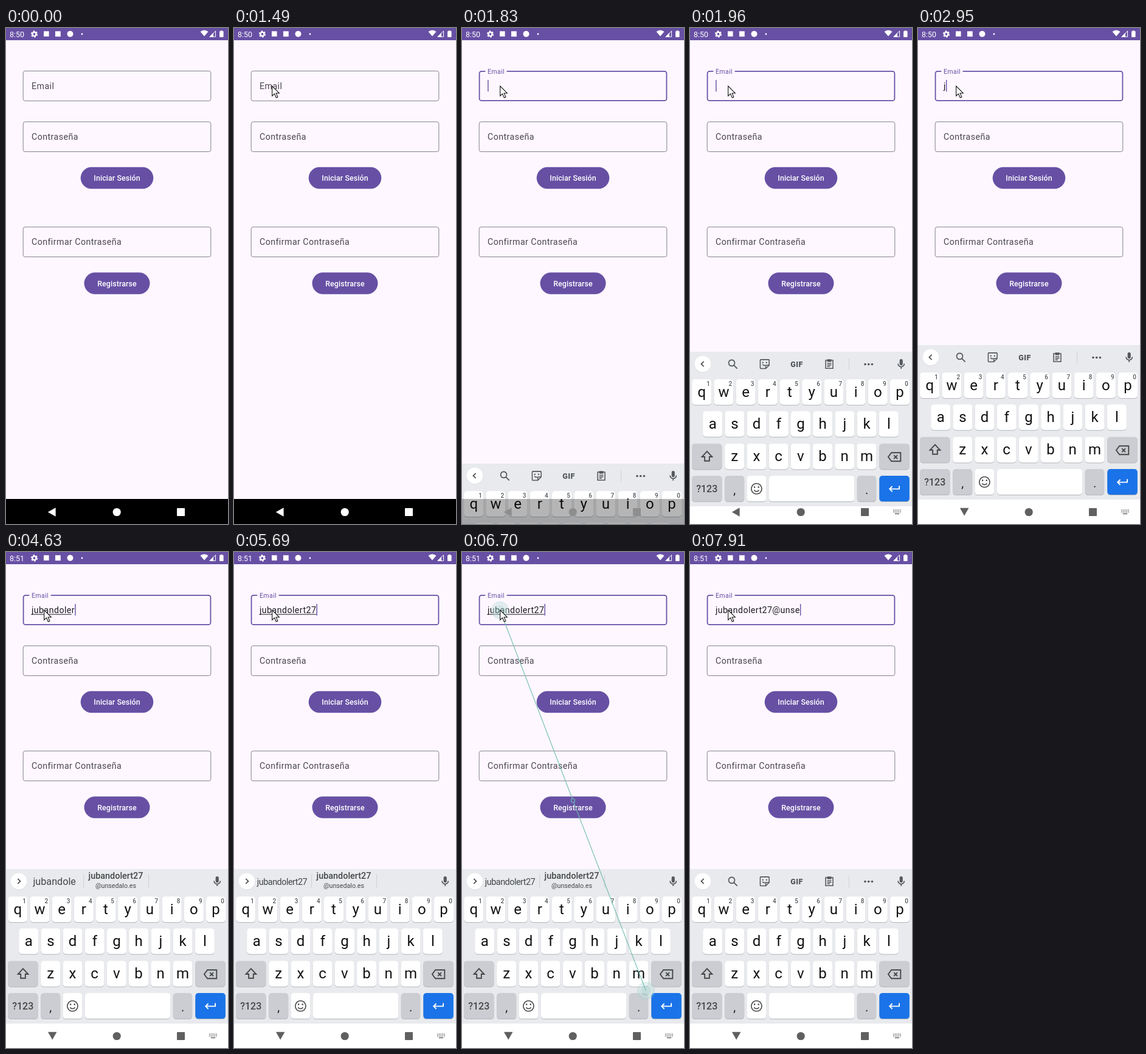
Animation of 365 by 812 pixels, one loop 8 s. Source, as an HTML page with a canvas:

```html
<!DOCTYPE html>
<html lang="es">
<head>
<meta charset="utf-8">
<title>Inicio de sesión</title>
<style>
html, body { margin: 0; width: 100%; height: 100%; overflow: hidden; background: #fef7ff; }
canvas { display: block; width: 365px; height: 812px; }
</style>
</head>
<body>
<canvas id="stage"></canvas>
<script>
const W = 365, H = 812, LOOP = 8000, MID = W / 2;
const PURPLE = '#6750a4', BG = '#fef7ff', INK = '#444746', TOOL = '#54575b';
const KEY_BG = '#e8eaed', DARK_KEY = '#cbcdd2';
const USER = 'jubandolert27', DOMAIN = '@unsedalo.es';
const TYPED = USER + DOMAIN.slice(0, 5);
const typeTimes = [2950, 3150, 3340, 3610, 3810, 3960, 4150, 4300, 4500, 4630, 4890, 5150, 5350,
  7300, 7370, 7570, 7700, 7910];
// The keyboard's composing word trails the typed text a little
const composeTimes = [3210, 3210, 3410, 3610, 3810, 3960, 4150, 4300, 4500, 4890, 5150, 5420, 5690];

const canvas = document.getElementById('stage');
const ratio = window.devicePixelRatio || 1;
canvas.width = W * ratio;
canvas.height = H * ratio;
const c = canvas.getContext('2d');

const clamp = v => Math.max(0, Math.min(1, v));
const lerp = (a, b, p) => a + (b - a) * p;
const countUntil = (times, t) => times.filter(x => x <= t).length;
const stepped = (t, start, step) => t < start ? t : start + Math.floor((t - start) / step) * step;

// cubic-bezier(.4, 0, .2, 1)
function standardEase(x) {
  let lo = 0, hi = 1;
  for (let i = 0; i < 20; i++) {
    const s = (lo + hi) / 2, r = 1 - s;
    if (1.2 * r * r * s + 0.6 * r * s * s + s * s * s < x) lo = s; else hi = s;
  }
  return lo * lo * (3 - 2 * lo);
}

function setFont(size, weight = 400, spacing = 0) {
  c.font = `${weight} ${size}px Roboto, sans-serif`;
  c.letterSpacing = spacing + 'px';
}

function text(str, x, y, size, color, { weight = 400, spacing = 0, align = 'left' } = {}) {
  setFont(size, weight, spacing);
  c.fillStyle = color;
  c.textAlign = align;
  c.fillText(str, x, y);
}

function rect(x, y, w, h, color) {
  c.fillStyle = color;
  c.fillRect(x, y, w, h);
}

function rounded(x, y, w, h, r, color) {
  c.fillStyle = color;
  c.beginPath();
  c.roundRect(x, y, w, h, r);
  c.fill();
}

function disc(x, y, r, color) {
  c.fillStyle = color;
  c.beginPath();
  c.arc(x, y, r, 0, Math.PI * 2);
  c.fill();
}

function poly(points, color) {
  c.fillStyle = color;
  c.beginPath();
  points.forEach(([x, y]) => c.lineTo(x, y));
  c.closePath();
  c.fill();
}

// Icons live on a 24 x 24 grid
function icon(x, y, size, { line, fill }, color = INK, width = 2) {
  c.save();
  c.translate(x, y);
  c.scale(size / 24, size / 24);
  c.translate(-12, -12);
  c.strokeStyle = c.fillStyle = color;
  c.lineWidth = width;
  if (fill) c.fill(new Path2D(fill));
  if (line) c.stroke(new Path2D(line));
  c.restore();
}

const EYES = 'M8.7 8a1.3 1.3 0 1 0 .01 0zM15.3 8a1.3 1.3 0 1 0 .01 0z';
const ICONS = {
  back: { line: 'M14 7l-5 5 5 5' },
  next: { line: 'M10 7l5 5-5 5' },
  search: { line: 'M10 4a5.8 5.8 0 1 0 .01 0M14 14l6.5 6.5' },
  sticker: {
    line: 'M5 4h14a1 1 0 0 1 1 1v9l-6 6H5a1 1 0 0 1-1-1V5a1 1 0 0 1 1-1zM20 14h-5a1 1 0 0 0-1 1v5M8 12.5a4 4 0 0 0 5 1.5',
    fill: EYES
  },
  clipboard: { line: 'M5 5h14v15.5H5zM8 11h8M8 14h8M8 17h5', fill: 'M8 3h8v5H8z' },
  mic: {
    line: 'M6 11.5a6 6 0 0 0 12 0M12 17.5v4',
    fill: 'M12 2.5a3 3 0 0 1 3 3v6a3 3 0 0 1-6 0v-6a3 3 0 0 1 3-3z'
  },
  shift: { line: 'M12 4L4 12.5h4.3V19h7.4v-6.5H20z' },
  erase: { line: 'M8 6h13v12H8L3.5 12zM11.5 9.5l5 5M16.5 9.5l-5 5' },
  emoji: { line: 'M12 3.5a8.5 8.5 0 1 0 .01 0M8 14a4.5 4.5 0 0 0 8 0', fill: EYES },
  enter: { line: 'M20 7v5H5M9 7.8L4.8 12 9 16.2' },
  wifi: { fill: 'M12 20L.5 6.5a17 17 0 0 1 23 0z' }
};

function statusBar(t) {
  const white = '#fff';
  rect(0, 0, W, 20, PURPLE);
  text(t < 4030 ? '8:50' : '8:51', 6, 14.5, 12.5, white);
  c.strokeStyle = white;
  c.lineWidth = 2.4;
  c.beginPath();
  c.arc(46.5, 10, 3.1, 0, Math.PI * 2);
  c.stroke();
  c.lineWidth = 1.7;
  c.setLineDash([2.6, 2.43]);
  c.beginPath();
  c.arc(46.5, 10, 4.8, 0, Math.PI * 2);
  c.stroke();
  c.setLineDash([]);
  rect(62, 5.3, 8.6, 8.6, white);
  rect(81, 5.3, 8.8, 8.8, white);
  disc(105.5, 9.8, 5, white);
  disc(125, 10, 1.4, white);
  icon(326, 9, 13.5, ICONS.wifi, white);
  poly([[334, 14.8], [341, 7.8], [341, 14.8]], white);
  c.lineWidth = 1;
  c.beginPath();
  c.moveTo(335.2, 14.3);
  c.lineTo(344.5, 14.3);
  c.lineTo(344.5, 5);
  c.closePath();
  c.stroke();
  rounded(351, 5, 6.6, 10, 1, white);
  rect(353, 4, 2.6, 1.5, white);
}

function outline(y, focused = false) {
  const i = focused ? 0.4 : 0;
  c.strokeStyle = focused ? PURPLE : '#79747e';
  c.lineWidth = focused ? 1.77 : 0.9;
  c.beginPath();
  c.roundRect(28.2 + i, y + i, 308.6 - 2 * i, 48.9 - 2 * i, 3.5);
  c.stroke();
}

const placeholder = (str, y) => text(str, 42, y, 14.2, '#49454f', { spacing: 0.443 });

function button(label, y, w) {
  rounded(MID - w / 2, y, w, 35.6, 17.8, PURPLE);
  text(label, MID, y + 22.6, 12.42, '#fff', { weight: 500, spacing: 0.09, align: 'center' });
}

function caretOn(t) {
  return t >= 1690 && !(t >= 2220 && t < 2680) && !(t >= 6170 && t < 6700);
}

function emailField(t) {
  const float = standardEase(clamp((stepped(t, 1490, 67) - 1600) / 167));
  outline(70.4, float > 0);
  if (float > 0) rect(lerp(56, 38.3, float), 68, 35.3 * float, 4.5, BG);
  text('Email', 42, lerp(99.5, 75, float), lerp(14.2, 10.64, float),
    float > 0 ? PURPLE : '#49454f', { spacing: lerp(0.443, 0.333, float) });

  const value = TYPED.slice(0, countUntil(typeTimes, t));
  text(value, 42, 100.3, 14.2, '#1d1b20', { spacing: 0.443 });
  if (t < 7300) {
    const composed = USER.slice(0, countUntil(composeTimes, t));
    if (composed) rect(42, 101.6, c.measureText(composed).width, 1, '#1d1b20');
  }
  if (caretOn(t)) rect(42.2 + c.measureText(value).width, 85, 1.4, 19, PURPLE);
}

function form(t) {
  rect(0, 20, W, H - 20, BG);
  emailField(t);
  outline(153.6);
  placeholder('Contraseña', 182.8);
  button('Iniciar Sesión', 227.7, 119.6);
  outline(325.8);
  placeholder('Confirmar Contraseña', 355.2);
  button('Registrarse', 400.2, 108);
}

function key(x, y, w, color = '#fff') {
  rounded(x, y + 1, w, 42, 5, '#b4b6ba');
  rounded(x, y, w, 42, 5, color);
}

function letterRow(letters, left, y, numbered) {
  [...letters].forEach((ch, i) => {
    const x = left + 36.2 * i;
    key(x, y, 32);
    text(ch, x + 16, y + 29, 24, '#111', { align: 'center' });
    if (numbered) text((i + 1) % 10, x + 27, y + 11, 10, '#55585c', { weight: 500, align: 'center' });
  });
}

function toolbar() {
  icon(21, 539, 20, ICONS.back, TOOL, 2.2);
  icon(70.3, 539.3, 21, ICONS.search, TOOL);
  icon(122.8, 539.2, 22, ICONS.sticker, TOOL, 1.7);
  text('GIF', 175.5, 543.5, 12.5, TOOL, { weight: 900, spacing: 0.5, align: 'center' });
  icon(229, 539, 20.5, ICONS.clipboard, TOOL, 1.8);
  rect(261, 530, 1, 19, '#d0d2d6');
  for (let i = -1; i <= 1; i++) disc(293.7 + i * 5.7, 539.5, 1.8, TOOL);
}

function suggestions(t) {
  const n = countUntil(composeTimes, t), mid = { align: 'center' };
  icon(21, 539, 20, ICONS.next, TOOL, 2.2);
  if (n > 11) text(USER.slice(0, n), 79, 544.5, 14.4, INK, { align: 'center', spacing: -0.5 });
  else text(USER.slice(0, n), 79.7, 545, 16.2, INK, mid);
  text(USER, 180.5, 534.5, 14.4, INK, { weight: 500, align: 'center' });
  text(DOMAIN, 180.5, 550, 10.7, INK, mid);
  if (n < 8) text(n < 4 ? 'junto' : 'jubón', 287, 545, 16.2, INK, mid);
  rect(127, 528, 1, 22, '#cfd1d5');
  rect(234, 528, 1, 22, '#cfd1d5');
}

function keyboard(t) {
  const p = standardEase(clamp((stepped(t, 1490, 67) - 1743) / 283));
  if (p <= 0) return;
  c.save();
  c.translate(0, Math.round(293 * (1 - p)));
  rect(0, 519, W, 253, KEY_BG);
  rect(0, 772, W, 40, '#fff');
  disc(21, 539.8, 13.3, '#d5d7db');
  disc(21, 539, 13.3, '#fff');
  if (t >= 3210 && t < 7370) suggestions(t); else toolbar();
  icon(347.2, 539, 20.5, ICONS.mic, TOOL);

  letterRow('qwertyuiop', 3.2, 564, true);
  letterRow('asdfghjkl', 21.2, 616.3);
  letterRow('zxcvbnm', 57.2, 669.4);
  key(3, 669.4, 49.5, DARK_KEY);
  icon(28, 690.5, 25, ICONS.shift, INK, 1.8);
  key(311.3, 669.4, 49.5, DARK_KEY);
  icon(335.8, 691.3, 28, ICONS.erase, INK, 1.6);

  const y = 722.1;
  key(3, y, 49.5, DARK_KEY);
  text('?123', 27.7, y + 27, 16, INK, { weight: 500, align: 'center' });
  key(57.2, y, 32, DARK_KEY);
  text(',', 73.2, y + 30, 20, '#222', { align: 'center' });
  key(93.4, y, 32);
  icon(109.4, y + 21.2, 24, ICONS.emoji, INK, 1.6);
  key(130, y, 140.3);
  key(274.7, y, 31.5, DARK_KEY);
  text('.', 290.7, y + 30, 20, '#222', { align: 'center' });
  key(311.3, y, 49.5, '#1a73e8');
  icon(335.7, y + 21.5, 25, ICONS.enter, '#fff', 1.8);
  c.restore();
}

function navBar(t) {
  const tt = stepped(t, 1490, 67);
  const fade = clamp((tt - 1740) / 120);
  if (fade < 1) {
    c.globalAlpha = 1 - fade;
    rect(0, 771, W, 41, '#000');
    c.globalAlpha = 1;
  }
  const v = Math.round(lerp(255, 96, fade)), color = `rgb(${v},${v},${v})`;
  const turn = standardEase(clamp((tt - 1965) / 250));
  c.save();
  c.translate(lerp(75.3, 76.2, turn), lerp(792.5, 792, turn));
  c.rotate(-turn * Math.PI / 2);
  poly([[-6.5, 0], [6.3, -7.3], [6.3, 7.3]], color);
  c.restore();
  disc(182.2, 792.5, 6.6, color);
  rounded(281, 786, 13, 13, 0.8, color);
  if (fade === 1) {
    for (let row = 0; row < 2; row++)
      for (let i = 0; i < 5; i++) rect(334 + i * 2.8, 788.5 + row * 2.9, 1.6, 1.7, '#777');
    rect(336.8, 794.4, 7.4, 1.7, '#777');
  }
}

// Two-finger touch overlay
function pinch(t) {
  if (t < 6700 || t >= 7100) return;
  const ends = [[62.5, 95.3], [302.4, 718.2]];
  c.globalAlpha = t < 7030 ? 1 : 0.5;
  for (const [x, y] of ends) {
    const g = c.createRadialGradient(x, y, 0, x, y, 14.5);
    g.addColorStop(0, 'rgba(150,205,198,.45)');
    g.addColorStop(0.55, 'rgba(150,205,198,.4)');
    g.addColorStop(0.65, 'rgba(205,230,228,.5)');
    g.addColorStop(1, 'rgba(150,205,198,.3)');
    disc(x, y, 14.5, g);
  }
  c.strokeStyle = '#72bdb1';
  c.lineWidth = 1.1;
  c.beginPath();
  c.moveTo(...ends[0]);
  c.lineTo(...ends[1]);
  c.stroke();
  c.beginPath();
  c.arc(182.5, 406.7, 3, 0, Math.PI * 2);
  c.fillStyle = PURPLE;
  c.fill();
  c.stroke();
  c.globalAlpha = 1;
}

const ARROW = new Path2D('M0 0V16.2L3.8 12.6 6.6 19 9.2 17.9 6.5 11.7H11.6Z');

function pointer(t) {
  if (t < 520) return;
  const p = 1 - Math.pow(1 - clamp((stepped(t, 520, 70) - 520) / 770), 1.8);
  c.save();
  c.translate(lerp(304, 62.7, p), lerp(800, 95, p));
  c.lineWidth = 1.1;
  c.fillStyle = '#fff';
  c.strokeStyle = '#111';
  c.fill(ARROW);
  c.stroke(ARROW);
  c.restore();
}

function draw(t) {
  c.setTransform(ratio, 0, 0, ratio, 0, 0);
  form(t);
  keyboard(t);
  navBar(t);
  statusBar(t);
  pinch(t);
  pointer(t);
}

const start = performance.now();
function frame() {
  draw((performance.now() - start) % LOOP);
  requestAnimationFrame(frame);
}
frame();
</script>
</body>
</html>
```
